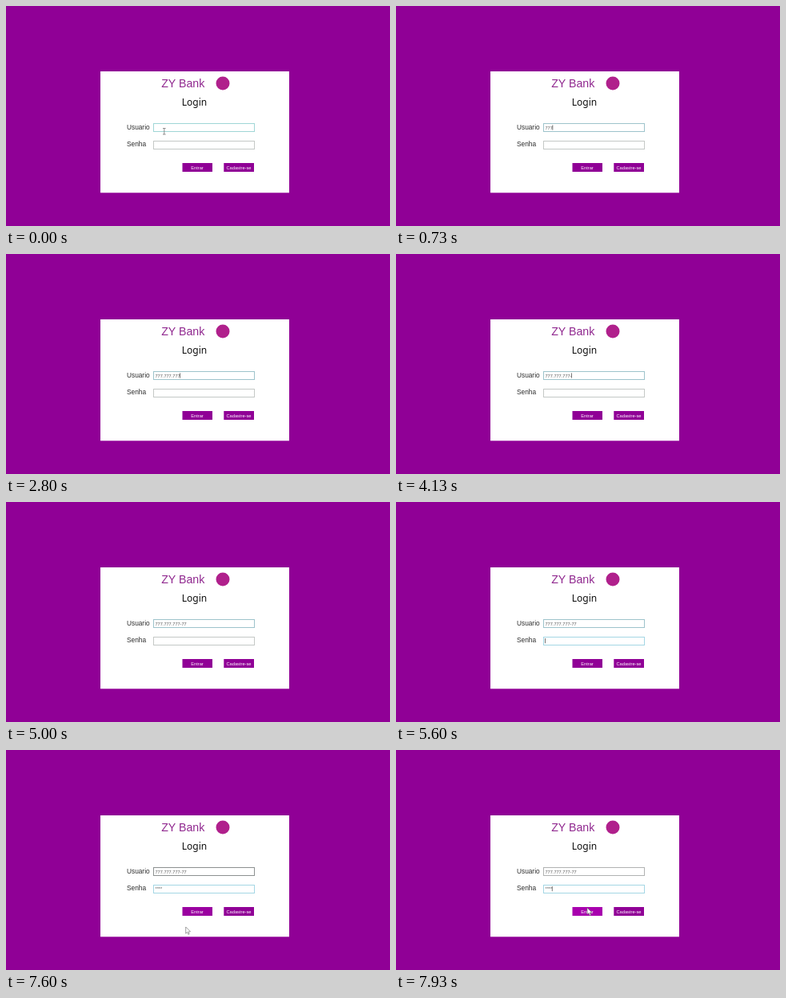
Animation of 480 by 276 pixels, one loop 8000 ms. Source, as an HTML page:

```html
<!DOCTYPE html>
<html lang="pt">
<head>
<meta charset="utf-8">
<title>Login</title>
<style>
  html, body { margin: 0; width: 100%; height: 100%; overflow: hidden; background: #900096; }
  svg { display: block; width: 480px; height: 276px; font-family: "Liberation Sans", Arial, sans-serif; }
  .field { fill: #fff; stroke: #c4c8c6; }
  .value { font-size: 5.6px; fill: #555; }
  .label { font-size: 8.3px; fill: #2c2c2c; }
  .button { fill: #900096; }
  .caption { font-size: 5.7px; fill: #fff; text-anchor: middle; }
</style>
</head>
<body>
<svg viewBox="0 0 480 276">
  <rect x="118" y="82" width="236" height="152.3" fill="#fff"/>
  <text x="194.2" y="102" font-size="14.2" fill="#90288f">ZY Bank</text>
  <circle cx="271" cy="97" r="8.5" fill="#b0208c"/>
  <text x="235.5" y="124.5" font-size="12" fill="#111" text-anchor="middle" font-family="Noto Sans, sans-serif">Login</text>
  <text class="label" x="151" y="154.8">Usuario</text>
  <text class="label" x="151" y="176.2">Senha</text>
  <rect class="field" id="userField" x="184.5" y="147.5" width="126" height="10"/>
  <rect class="field" id="passField" x="184.5" y="169.5" width="126" height="10"/>
  <text class="value" id="user" x="186.5" y="154.6"></text>
  <text class="value" id="pass" x="186.5" y="175.7"></text>
  <rect id="caret" width=".8" height="6.2" fill="#555"/>
  <rect class="button" id="enter" x="220.5" y="197" width="37.5" height="11"/>
  <rect class="button" x="272.3" y="197" width="37.7" height="11"/>
  <text class="caption" x="239" y="204.7">Entrar</text>
  <text class="caption" x="291" y="204.7">Cadastre-se</text>
  <path id="beam" d="M196 153.5h3.6M197.8 153.5v7.5M196 161h3.6" fill="none" stroke="#777" stroke-width=".8"/>
  <path id="arrow" d="M0 0V8.2L1.9 6.5L3.2 9.4L4.5 8.8L3.2 6L5.8 5.8Z" fill="#fff" stroke="#777" stroke-width=".7"/>
</svg>
<script>
const LOOP = 8000, BLINK = 530, FOCUS_PASS = 5530;
const USER = "777.777.777-77", PASS = "****";
const userKeys = [200, 470, 730, 1530, 1730, 1870, 2070, 2270, 2470, 2600, 2730, 3930, 4330, 4470];
const passKeys = [5930, 6130, 6470, 6870];
// Pointer path: time, x, y
const path = [[7270, 211, 119], [7600, 224.7, 222], [7870, 239, 198], [LOOP, 239, 198]];
const $ = id => document.getElementById(id);
const show = (el, on) => el.setAttribute("visibility", on ? "visible" : "hidden");
const pressed = (keys, t) => keys.filter(k => k <= t).length;

function pointerAt(t) {
  const i = path.findIndex(p => t < p[0]);
  if (i < 1) return null;
  const [t0, x0, y0] = path[i - 1], [t1, x1, y1] = path[i];
  const u = (t - t0) / (t1 - t0), e = u * u * (3 - 2 * u);
  return [x0 + (x1 - x0) * e, y0 + (y1 - y0) * e];
}

function userBorder(t) {
  if (t < 200) return "#9fd6d6";
  if (t < 6070) return "#9dc3cb";
  return t < 7900 ? "#8c9090" : "#b0b2b2";
}

// The button glows while the pointer is on it and dims as it moves away.
function glow(pointer) {
  if (!pointer) return 0;
  const away = Math.max(0, 197 - pointer[1], pointer[1] - 208);
  return Math.max(0, 1 - away / 24);
}

function draw(t) {
  const inPass = t >= FOCUS_PASS;
  $("user").textContent = USER.slice(0, pressed(userKeys, t));
  $("pass").textContent = PASS.slice(0, pressed(passKeys, t));
  $("userField").style.stroke = userBorder(t);
  $("passField").style.stroke = inPass ? "#a4d6e4" : "#c4c8c6";

  const last = Math.max(...[...userKeys, FOCUS_PASS, ...passKeys].filter(k => k <= t));
  const text = $(inPass ? "pass" : "user");
  const width = text.textContent ? text.getComputedTextLength() : 0;
  $("caret").setAttribute("x", 186.1 + width);
  $("caret").setAttribute("y", inPass ? 171 : 149.4);
  show($("caret"), t >= userKeys[0] && Math.floor((t - last) / BLINK) % 2 === 0);

  const pointer = pointerAt(t), hover = glow(pointer);
  show($("beam"), t < 200);
  show($("arrow"), pointer);
  if (pointer) $("arrow").setAttribute("transform", `translate(${pointer})`);
  $("enter").style.fill = `rgb(${144 + 24 * hover}, 0, ${150 + 24 * hover})`;
}

function tick() {
  draw(performance.now() % LOOP);
  requestAnimationFrame(tick);
}
tick();
</script>
</body>
</html>
```
